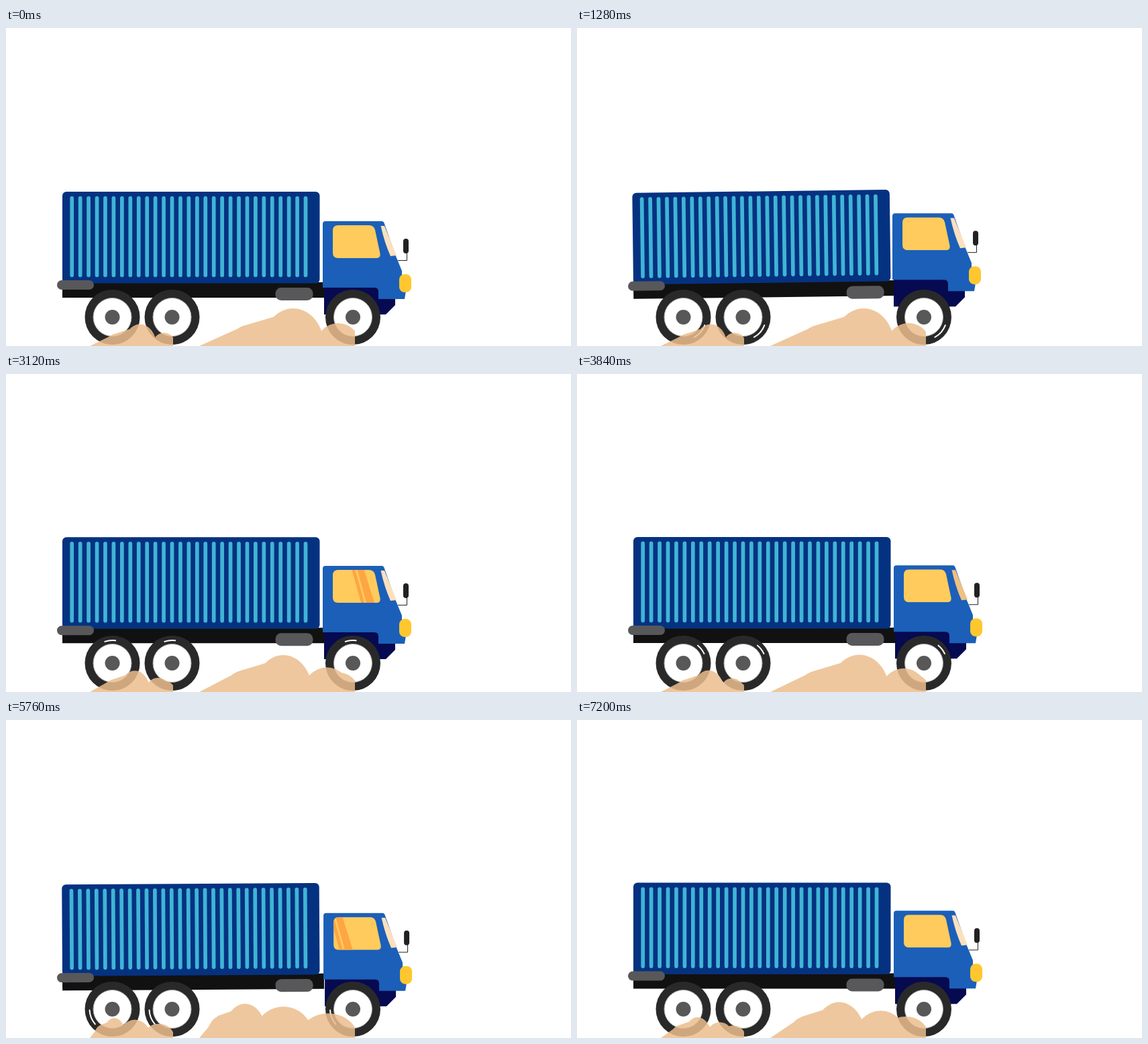
An HTML page that plays this animation: 842x474 px, repeating every 7.28 s.

```html
<!DOCTYPE html>
<html lang="en">
<head>
<meta charset="utf-8">
<title>Truck on a dusty road</title>
<style>
  html, body { margin: 0; width: 100%; height: 100%; overflow: hidden; background: #fff; }
  svg { display: block; width: 842px; height: 474px; }
</style>
</head>
<body>
<svg viewBox="0 0 842 474">
  <defs>
    <clipPath id="pane"><path d="M495 294H541q7 0 9 7L557.500 336q1 7-5 7H495q-8 0-8-8V302q0-8 8-8z"/></clipPath>
    <clipPath id="ground"><rect x="288" y="400" width="232" height="74"/></clipPath>
  </defs>

  <g id="load">
    <rect x="84" y="379" width="390" height="23" fill="#111"/>
    <rect x="84" y="244" width="383.500" height="136.500" rx="6" fill="#053280"/>
    <g id="slats" stroke="#40b4d6" stroke-width="5.700" stroke-linecap="round"></g>
    <rect x="76" y="376" width="55" height="14" rx="7" fill="#58585a"/>
    <rect x="401.500" y="387" width="56" height="19" rx="8.500" fill="#58585a"/>
  </g>

  <g id="cab">
    <path d="M474 385H560V403H580V413L566 427H474z" fill="#060a50"/>
    <path d="M472 292q0-4 4-4H560q3 0 4 4L581 340 590 362V392H596L594 404H555V393q0-6-6-6H472z" fill="#1b5fb8"/>
    <g clip-path="url(#pane)">
      <rect x="480" y="288" width="85" height="60" fill="#ffcb5c"/>
      <path id="shine" d="M490 293H500L516 344H504zM482 293H487L501 344H496z" fill="#ffa542"/>
    </g>
    <path id="screen" d="M558.500 295H564L582 339 573 340Q564 320 558.500 295z"/>
    <path d="M597.500 334V346.500H584" fill="none" stroke="#222"/>
    <rect x="592" y="314" width="8" height="22" rx="4" fill="#222"/>
    <rect x="586" y="367" width="18" height="27" rx="8" fill="#ffc72f"/>
  </g>

  <g id="wheels"></g>

  <g fill="#ebbe8d" fill-opacity=".85">
    <g clip-path="url(#ground)"><path class="dust"/></g>
    <g transform="translate(125 474) scale(.534 .58) translate(-288 -474)">
      <g clip-path="url(#ground)"><path class="dust"/></g>
    </g>
  </g>
</svg>

<script>
const LOOP = 7280, STEP = 80, BASE = 474, TURN = 2 * Math.PI;
const $ = id => document.getElementById(id);
const load = $('load'), cab = $('cab'), shine = $('shine'), screenGlass = $('screen');

for (let i = 0; i < 29; i++) {
  const x = (98.2 + i * 12.44).toFixed(2);
  $('slats').innerHTML += `<path d="M${x} 253.500V368.500"/>`;
}

for (const x of [158.5, 247.5, 517]) {
  $('wheels').innerHTML += `<g transform="translate(${x} 431)">
    <circle r="41" fill="#292929"/><circle r="28.500" fill="#fff" stroke="#aaa"/>
    <circle r="11" fill="#585858"/>
    <path class="glint" fill="none" stroke="#fff" stroke-width="2" stroke-linecap="round"/></g>`;
}
const glints = document.querySelectorAll('.glint');
const dusts = document.querySelectorAll('.dust');

// Each puff drifts left: x, top and half width at both ends of its life
const puffs = [
  { from: [365, 442, 34], to: [323, 440, 25] },
  { from: [428, 418, 46], to: [355, 423, 33] },
  { from: [495, 440, 33], to: [412, 427, 45] },
  { from: [500, 447, 26], to: [480, 437, 44] }
];

const bump = (t, mid, width) => Math.exp(-(((t - mid) / width) ** 2));

function arc(mid, len) {
  if (len < 1) return '';
  const point = deg => {
    const a = deg * Math.PI / 180;
    return `${(34 * Math.cos(a)).toFixed(2)} ${(34 * Math.sin(a)).toFixed(2)}`;
  };
  return `M${point(mid - len / 2)}A34 34 0 0 1 ${point(mid + len / 2)}`;
}

function dustPath(age) {
  const k = Math.min(1, 1.1 * age * age);
  const now = puffs.map(({ from, to }) => from.map((v, i) => v + (to[i] - v) * k));
  const [[x0, y0], [x1, y1]] = now;
  const slope = `M288 ${BASE}L${x0 - 8} ${y0 + 1}L${x1} ${y1 + 4}V${BASE}z`;
  return slope + now.map(([x, top, r]) =>
    `M${x - r} ${BASE}A${r} ${BASE - top} 0 0 1 ${x + r} ${BASE}z`).join('');
}

function moveTruck(t) {
  const road = t % (LOOP / 2);
  const beat = t / LOOP * 37 % 1;
  const shake = Math.sin(Math.PI * beat ** 1.8) ** 2;
  const lean = bump(road, 1560, 560);

  const x = 2 * bump(road, 1980, 180) - 2 * bump(road, 1300, 300);
  const y = -4.1 * shake - 9.4 * bump(road, 1250, 250);
  cab.setAttribute('transform', `translate(${x} ${y})`);
  load.setAttribute('transform',
    `translate(0 ${.6 * lean - 1.6 * shake}) rotate(${-.92 * lean} 270 380)`);
}

function spinWheels(t) {
  const u = t / LOOP, swing = Math.cos(TURN * u);
  const angle = 12 * 360 * u - 768 + 110 * swing;
  const fade = Math.min(1, 8 * Math.sin(Math.PI * u) ** 2);
  const d = arc(angle, (36 + 10 * swing) * fade);
  glints.forEach(g => g.setAttribute('d', d));
}

function reflect(t) {
  const sweep = t % (LOOP / 6);
  shine.setAttribute('transform', `translate(${(907 - sweep) * .156} 0)`);
  screenGlass.setAttribute('fill', sweep > 120 && sweep < 330 ? '#eec083' : '#fbe0bd');
}

function draw(t) {
  moveTruck(t);
  spinWheels(t);
  reflect(t);
  const cloud = dustPath(t * 29 / LOOP % 1);
  dusts.forEach(p => p.setAttribute('d', cloud));
}

const begin = performance.now();
function tick() {
  const t = (performance.now() - begin) % LOOP;
  draw(Math.floor(t / STEP) * STEP);
  requestAnimationFrame(tick);
}
tick();
</script>
</body>
</html>
```
